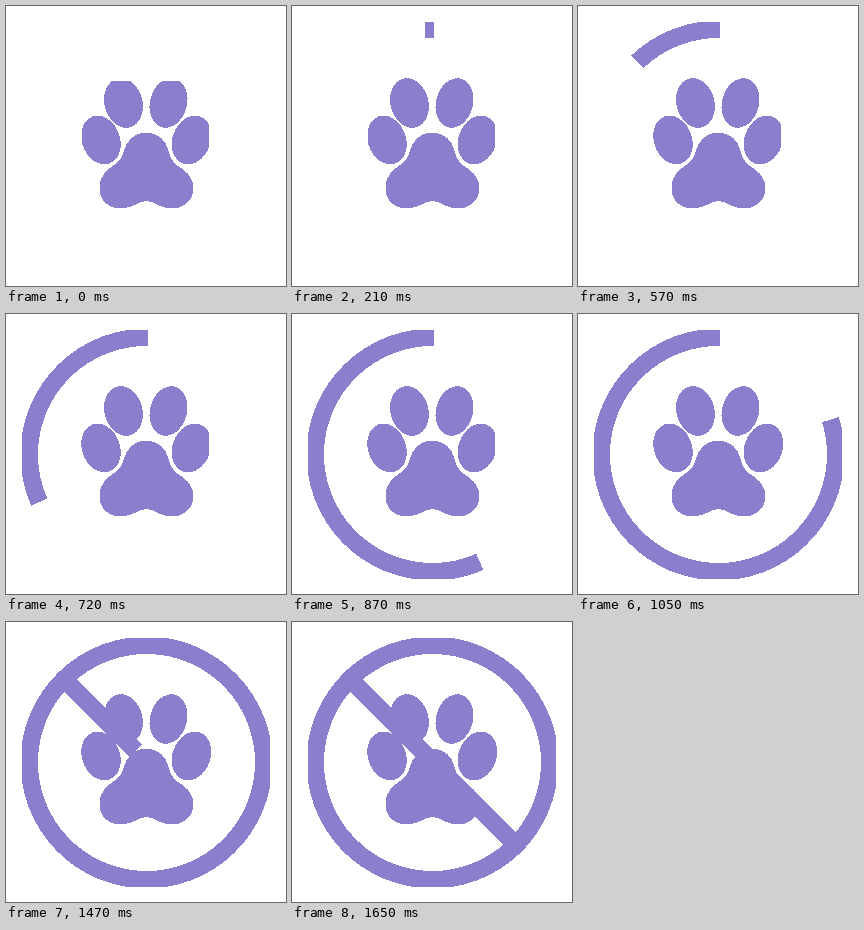
Animation, 280 px wide and 280 px high, one loop 2100 ms. Source, as an HTML page:

```html
<!DOCTYPE html>
<html lang="en">
<head>
<meta charset="utf-8">
<title>No pets</title>
<style>
  html, body { margin: 0; width: 100%; height: 100%; overflow: hidden; background: #fff; }
  svg { display: block; width: 100vw; height: 100vh; shape-rendering: crispEdges; }
  .line { fill: none; stroke: #8b7ecd; }
</style>
</head>
<body>
<svg viewBox="0 0 280 280">
  <clipPath id="window"><rect id="crop"/></clipPath>
  <clipPath id="frame"><rect x="16" y="16" width="248" height="249"/></clipPath>
  <g fill="#8b7ecd" clip-path="url(#window)">
    <ellipse rx="19" ry="25.2" transform="translate(117.5 97) rotate(-15)"/>
    <ellipse rx="18.5" ry="25.2" transform="translate(162.5 97) rotate(15)"/>
    <ellipse rx="19" ry="25" transform="translate(95 134) rotate(-20)"/>
    <ellipse rx="19" ry="25" transform="translate(185.5 134) rotate(20)"/>
    <path d="M140.3 126.5C152 126.5 160 134 163 146C165 155 169 158 177 163.5C183.5 168 187.5 175 187.5 182
      C187.5 194 178 202.5 166 202.5C154 202.5 148 195 140.3 195C132.5 195 126.5 202.5 114.5 202.5
      C102 202.5 93.5 194 93.5 182C93.5 175 96.5 168 102.5 163C110.5 157 115.5 155 117.5 146
      C120.5 134 128.5 126.5 140.3 126.5Z"/>
  </g>
  <g clip-path="url(#frame)">
    <circle id="ring" class="line" r="117.25" stroke-width="17.5" pathLength="360"
      transform="translate(140.5 140.5) rotate(-89.3) scale(1 -1)"/>
    <path id="slash" class="line" d="M58.6 57.6L223.4 222.4" stroke-width="18.2" pathLength="100"/>
  </g>
</svg>
<script>
  const LOOP = 2100, STEP = 30;
  const [ring, slash, crop] = ['ring', 'slash', 'crop'].map(id => document.getElementById(id));

  // time in ms, swept degrees, degrees per ms
  const sweep = [
    [60, 0, 0.015],
    [210, 4.4, 0.03],
    [600, 54.5, 0.36],
    [870, 204.5, 0.53],
    [1050, 288, 0.44],
    [1260, 360, 0.2]
  ];

  function hermite(keys, t) {
    if (t <= keys[0][0]) return keys[0][1];
    const i = keys.findIndex(k => k[0] >= t);
    if (i < 0) return keys[keys.length - 1][1];
    const [t0, y0, m0] = keys[i - 1], [t1, y1, m1] = keys[i];
    const d = t1 - t0, u = (t - t0) / d, v = 1 - u;
    return y0 + (y1 - y0) * u * u * (3 - 2 * u) + d * u * v * (m0 * v - m1 * u);
  }

  function smooth(t, from, to) {
    const u = Math.min(1, Math.max(0, (t - from) / (to - from)));
    return u * u * (3 - 2 * u);
  }

  function reveal(el, amount) {
    el.style.display = amount > 0 ? '' : 'none';
    el.setAttribute('stroke-dasharray', amount + ' 999');
  }

  function setCrop(t) {
    const left = t < 480 ? 76 : 0, top = t < 90 ? 75 : 0, right = t < 900 ? 203 : 280;
    crop.setAttribute('x', left);
    crop.setAttribute('y', top);
    crop.setAttribute('width', right - left);
    crop.setAttribute('height', 280 - top);
  }

  const start = performance.now();
  function draw() {
    const now = Math.max(0, performance.now() - start) % LOOP;
    const t = Math.floor(now / STEP) * STEP;
    reveal(ring, hermite(sweep, t));
    reveal(slash, 100 * smooth(t, 1320, 1650));
    setCrop(t);
    requestAnimationFrame(draw);
  }
  draw();
</script>
</body>
</html>
```
